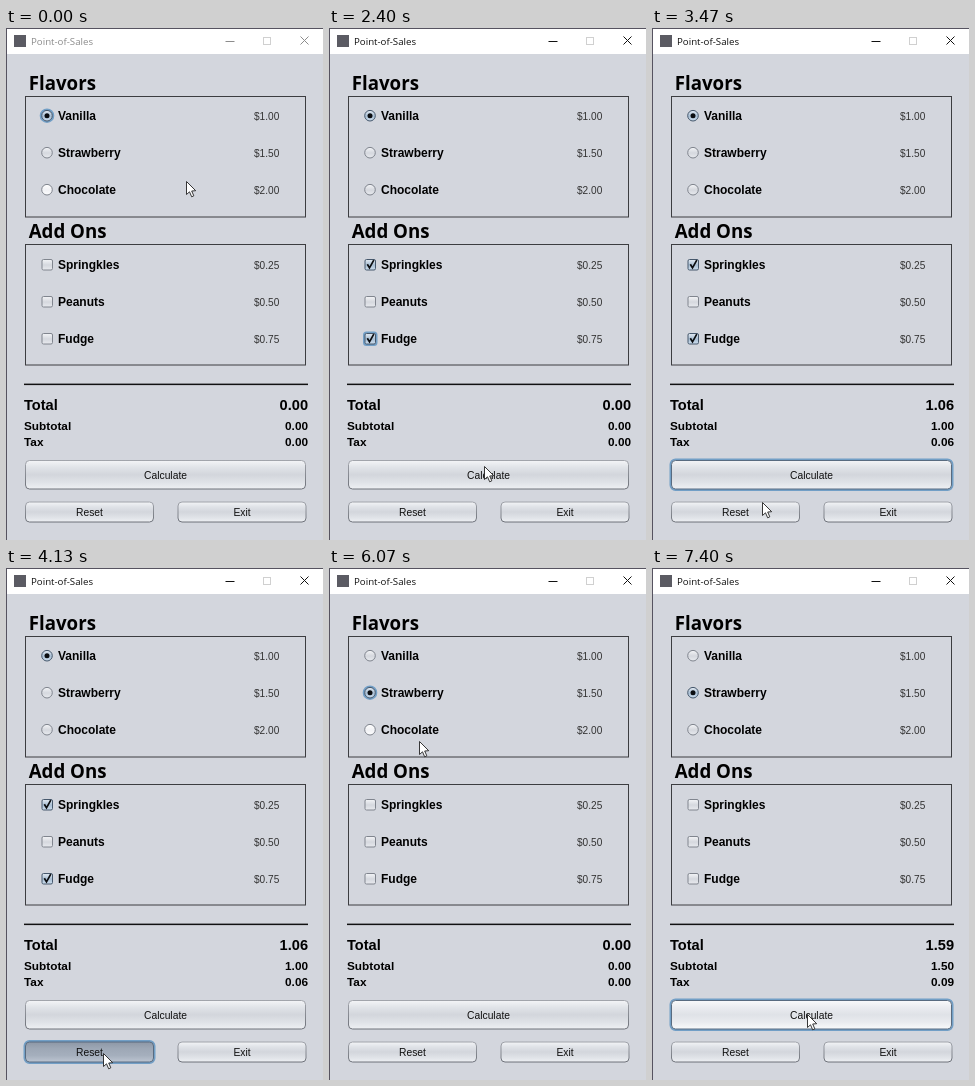
Write an HTML page with a canvas that moves like this. It is 317x512 px and loops after 8 s.

```html
<!DOCTYPE html>
<html lang="en">
<head>
<meta charset="utf-8">
<title>Point-of-Sales</title>
<style>
html, body { margin: 0; width: 100%; height: 100%; overflow: hidden; background: #d3d6dd; }
canvas { display: block; width: 317px; height: 512px; }
</style>
</head>
<body>
<canvas id="stage"></canvas>
<script>
const W = 317, H = 512, LOOP = 8000, FPS = 15;
const canvas = document.getElementById('stage');
const ctx = canvas.getContext('2d');
const dpr = window.devicePixelRatio || 1;
canvas.width = W * dpr;
canvas.height = H * dpr;

const ARIAL = '"Liberation Sans", Arial, sans-serif';
const HUMANIST = '"Open Sans", "Noto Sans", sans-serif';

const flavors = [['Vanilla', '$1.00', 88], ['Strawberry', '$1.50', 125], ['Chocolate', '$2.00', 162]];
const addOns = [['Springkles', '$0.25', 237], ['Peanuts', '$0.50', 274], ['Fudge', '$0.75', 311]];
const buttons = [
  ['Calculate', 19, 432, 281, 29.5],
  ['Reset', 19, 473.5, 129, 21],
  ['Exit', 171.5, 473.5, 129, 21]
];

// Pointer path: tick, x, y
const path = [
  [9, 180, 153], [12, 158, 172], [16, 99, 233], [17, 97, 235], [19, 97, 235], [22, 86, 273],
  [23, 85, 284], [25, 83, 311], [30, 83, 311], [34, 139, 405], [36, 155, 438], [38, 155, 445],
  [47, 155, 445], [52, 110, 474], [56, 97, 485], [63, 97, 485], [67, 100, 385], [71, 97, 230],
  [73, 95, 192], [79, 93, 128], [87, 93, 128], [91, 90, 173], [95, 118, 310], [98, 150, 420],
  [100, 155, 446]
];
const focusAt = [[0, 'Vanilla'], [17, 'Springkles'], [28, 'Fudge'], [40, 'Calculate'],
  [61, 'Reset'], [81, 'Strawberry'], [110, 'Calculate']];
const presses = [['Springkles', 17, 19], ['Fudge', 28, 30], ['Calculate', 40, 41],
  ['Reset', 61, 63], ['Strawberry', 81, 83], ['Calculate', 110, 111]];
const totalsAt = [[0, '0.00', '0.00', '0.00'], [41, '1.06', '1.00', '0.06'],
  [63, '0.00', '0.00', '0.00'], [111, '1.59', '1.50', '0.09']];

const latest = (list, k) => list.filter(e => e[0] <= k).pop();

function pointer(k) {
  const i = path.findIndex(p => p[0] > k);
  if (i === 0) return path[0].slice(1);
  if (i < 0) return path[path.length - 1].slice(1);
  const [t0, x0, y0] = path[i - 1], [t1, x1, y1] = path[i];
  const u = (k - t0) / (t1 - t0);
  return [x0 + (x1 - x0) * u, y0 + (y1 - y0) * u];
}

function hovered([x, y]) {
  const row = [...flavors, ...addOns].find(r => x > 34 && x < 190 && Math.abs(y - r[2]) <= 10);
  const button = buttons.find(([, bx, by, w, h]) => x > bx && x < bx + w && y > by && y < by + h);
  return (row || button || [''])[0];
}

function stateAt(k) {
  const press = presses.find(p => k >= p[1] && k < p[2]);
  return {
    active: k >= 17,
    focus: latest(focusAt, k)[1],
    pressed: press ? press[0] : '',
    hover: hovered(pointer(k - 1)),
    flavor: k >= 83 ? 'Strawberry' : 'Vanilla',
    checked: [k >= 19 && k < 63 && 'Springkles', k >= 30 && k < 63 && 'Fudge'],
    totals: latest(totalsAt, k).slice(1)
  };
}

function text(s, x, y, font, color = '#000', align = 'left') {
  ctx.font = font;
  ctx.fillStyle = color;
  ctx.textAlign = align;
  ctx.fillText(s, x, y);
}

function gradient(y, h, ...colors) {
  const g = ctx.createLinearGradient(0, y, 0, y + h);
  colors.forEach((c, i) => g.addColorStop(i / (colors.length - 1), c));
  return g;
}

function paint(fill, stroke, width = 1) {
  ctx.fillStyle = fill;
  ctx.fill();
  ctx.strokeStyle = stroke;
  ctx.lineWidth = width;
  ctx.stroke();
}

function round(x, y, w, h, r) {
  ctx.beginPath();
  ctx.roundRect(x, y, w, h, r);
}

function line(points, color, width) {
  ctx.beginPath();
  points.forEach(([x, y]) => ctx.lineTo(x, y));
  ctx.strokeStyle = color;
  ctx.lineWidth = width;
  ctx.stroke();
}

function titleBar(active) {
  ctx.fillStyle = '#fff';
  ctx.fillRect(0, 0, W, 26);
  ctx.fillStyle = '#565360';
  ctx.fillRect(0, 0, W, 1);
  ctx.fillRect(0, 0, 1, H);
  ctx.fillStyle = '#5b5b63';
  ctx.fillRect(8, 7, 12, 12);
  const ink = active ? '#111' : '#8c8c8c';
  text('Point-of-Sales', 25, 16.5, '9.7px ' + HUMANIST, ink);
  line([[219.5, 13.5], [228.5, 13.5]], ink, 1);
  ctx.strokeStyle = '#d0d0d0';
  ctx.strokeRect(257.5, 9.5, 7, 7);
  line([[294.5, 8.5], [302.5, 16.5]], ink, 1);
  line([[302.5, 8.5], [294.5, 16.5]], ink, 1);
}

// Face colours shared by radio buttons and check boxes
function markFill(y, on, name, s) {
  if (s.pressed === name) return gradient(y - 6, 12, '#9ba3b0', '#a4adba', '#c0c8d4');
  if (on) return gradient(y - 6, 12, '#e8eef5', '#a9bfd4', '#d3e3f2');
  if (s.hover === name) return gradient(y - 6, 12, '#ffffff', '#f1f2f5', '#ffffff');
  return gradient(y - 6, 12, '#f6f7f9', '#d5d8de', '#eceef2');
}

function radio([name, , y], s) {
  const on = s.flavor === name, focus = s.focus === name;
  if (focus) {
    ctx.beginPath();
    ctx.arc(41, y - .3, 6.3, 0, 7);
    ctx.strokeStyle = '#729fc6';
    ctx.lineWidth = 2;
    ctx.stroke();
  }
  ctx.beginPath();
  ctx.arc(41, y - .3, 5.3, 0, 7);
  paint(markFill(y, on, name, s), on ? '#46586c' : '#80858e');
  if (on) {
    ctx.beginPath();
    ctx.arc(41, y - .3, 2.5, 0, 7);
    ctx.fillStyle = '#0b0d10';
    ctx.fill();
  }
}

function checkBox([name, , y], s) {
  const on = s.checked.includes(name);
  if (s.focus === name) {
    round(35, y - 6.5, 12.5, 12.5, 2.5);
    ctx.strokeStyle = '#729fc6';
    ctx.lineWidth = 2;
    ctx.stroke();
  }
  round(36, y - 5.5, 10.5, 10.5, 1.5);
  paint(markFill(y, on, name, s), on || s.pressed === name ? '#46586c' : '#80858e');
  if (on) line([[38.3, y - .8], [40.5, y + 2.8], [44.8, y - 4.8]], '#0b0d10', 1.7);
}

function group(title, y, rows, mark, s) {
  text(title, 22.7, y - 6, 'bold 18.7px ' + HUMANIST);
  ctx.strokeStyle = '#3c3d40';
  ctx.lineWidth = 1;
  ctx.strokeRect(19.5, y + .5, 280, 120.5);
  rows.forEach(row => {
    mark(row, s);
    text(row[0], 52, row[2] + 4.2, 'bold 12px ' + ARIAL);
    text(row[1], 248, row[2] + 3.6, '10.1px ' + ARIAL, '#333');
  });
}

function button([name, x, y, w, h], s) {
  const focus = s.focus === name;
  if (focus) {
    round(x - .5, y - .5, w + 1, h + 1, 5);
    ctx.strokeStyle = '#729fc6';
    ctx.lineWidth = 2;
    ctx.stroke();
  }
  let fill = gradient(y, h, '#f5f6f8', '#e0e3e8', '#d3d6dc', '#dfe2e7', '#eff1f4');
  if (s.hover === name) fill = gradient(y, h, '#fafbfc', '#eaecf0', '#dfe2e7', '#e9ebef', '#fafbfc');
  if (s.pressed === name) fill = gradient(y, h, '#8c96a5', '#9da7b5', '#a5afbd', '#bdc6d2');
  round(x + .5, y + .5, w - 1, h - 1, 4);
  paint(fill, focus ? '#586b80' : gradient(y, h, '#a2a5ac', '#6c7078'));
  text(name, x + w / 2, y + h / 2 + 3.9, '10.3px ' + ARIAL, '#111', 'center');
}

function totals(values) {
  ctx.fillStyle = '#111';
  ctx.fillRect(18, 355.6, 284, 1.5);
  [['Total', 382, 14.6], ['Subtotal', 402, 11.8], ['Tax', 418, 11.8]].forEach(([label, y, size], i) => {
    const font = `bold ${size}px ${ARIAL}`;
    text(label, 18, y, font);
    text(values[i], 302, y, font, '#000', 'right');
  });
}

function arrow(x, y) {
  const shape = [[0, 0], [0, 13], [3, 10.3], [5.2, 15.3], [7.3, 14.3], [5.2, 9.5], [9.2, 9.2]];
  ctx.beginPath();
  shape.forEach(([dx, dy]) => ctx.lineTo(x + dx + .5, y + dy + .5));
  ctx.closePath();
  paint('#fff', '#222', .9);
}

function draw(ms) {
  const k = Math.floor(ms * FPS / 1000 + .06);
  const s = stateAt(k);
  ctx.setTransform(dpr, 0, 0, dpr, 0, 0);
  ctx.fillStyle = '#d3d6dd';
  ctx.fillRect(0, 0, W, H);
  titleBar(s.active);
  group('Flavors', 68, flavors, radio, s);
  group('Add Ons', 216, addOns, checkBox, s);
  totals(s.totals);
  buttons.forEach(b => button(b, s));
  arrow(...pointer(k));
}

const start = performance.now();
function tick() {
  draw((performance.now() - start) % LOOP);
  requestAnimationFrame(tick);
}
tick();
</script>
</body>
</html>
```
